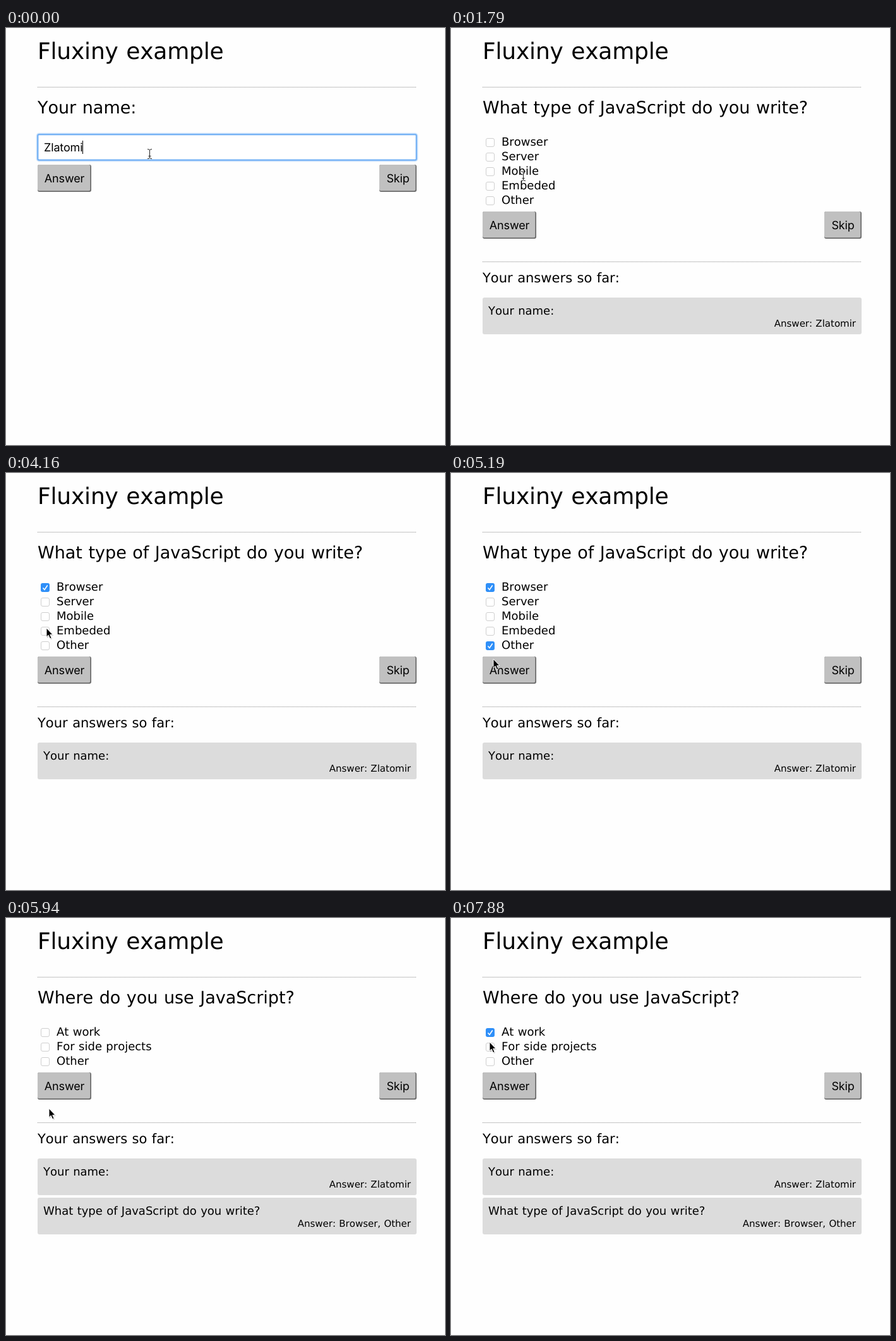
Write an HTML page that moves like this. It is 695 px wide and 659 px high and loops after 8 s.

```html
<!DOCTYPE html>
<html lang="en">
<head>
<meta charset="utf-8">
<title>Fluxiny example</title>
<style>
  html, body { margin: 0; width: 100%; height: 100%; overflow: hidden; background: #fefefe; }
  svg { display: block; width: 695px; height: 659px; }
  text {
    font-family: "DejaVu Sans", Verdana, sans-serif;
    font-size: 18px; word-spacing: .034em; font-kerning: none;
    text-rendering: geometricPrecision; white-space: pre;
  }
  .h1 { font-size: 36px; letter-spacing: -.005em; }
  .h2 { font-size: 27px; }
  .h3 { font-size: 21.06px; }
  .small { font-size: 15px; text-anchor: end; }
  .ui { font-family: Inter, Roboto, sans-serif; letter-spacing: -.008em; word-spacing: 0; font-kerning: normal; }
  .mid { text-anchor: middle; }
  .ring rect { fill: none; stroke: #4c9bf2; }
  .dots { stroke: #8c8c8c; stroke-dasharray: 1 1; }
</style>
</head>
<body>
<svg viewBox="0 0 695 659">
  <rect width="695" height="659" fill="#fefefe"/>
  <text class="h1" x="50" y="49">Fluxiny example</text>
  <path class="dots" d="M50 93.5H650"/>
  <g id="page"></g>
  <g id="arrow">
    <path d="M1 1.5V16l3.3-3 2.4 5.2 2.4-1L6.800 12H11.300Z" fill="#000" opacity=".18"/>
    <path d="M0 0V14.200l3.200-3 2.500 5.600 2.400-1-2.400-5.300H10Z" fill="#000" stroke="#fff" stroke-width="1"/>
  </g>
  <g id="beam" fill="none">
    <path d="M.5-7V7" stroke="#fff" stroke-width="3" opacity=".7"/>
    <path d="M-3-7.500Q.5-7.500 .5-5.500V5.500Q.5 7.500-3 7.500M4-7.500Q.5-7.500 .5-5.500M4 7.500Q.5 7.500 .5 5.500M-1.500 3.500H2.500" stroke="#222"/>
  </g>
</svg>
<script>
const LOOP = 8000;
const NAME = 'Zlatomir';
const $ = id => document.getElementById(id);
const page = $('page');

const languages = {
  title: 'What type of JavaScript do you write?',
  options: ['Browser', 'Server', 'Mobile', 'Embeded', 'Other']
};
const places = {
  title: 'Where do you use JavaScript?',
  options: ['At work', 'For side projects', 'Other']
};
const answers = [['Your name:', NAME], [languages.title, 'Browser, Other']];

// Pointer moves: start time, step length, step count, from, to, sideways bend
const moves = [
  [590, 150, 4, [227, 199], [114, 234], 0],
  [2390, 146.7, 6, [114, 234], [63, 184], 0],
  [3570, 147.1, 8, [63, 184], [65, 273], 0],
  [4898, 147.5, 3, [65, 273], [68, 301], 0],
  [6540, 148.6, 8, [68, 301], [61, 184], -8],
  [7880, 120, 1, [61, 184], [61, 196], 0]
];

const text = (cls, x, y, str) => `<text class="${cls}" x="${x}" y="${y}">${str}</text>`;
const rect = (x, y, w, h, r, attrs) =>
  `<rect x="${x}" y="${y}" width="${w}" height="${h}" rx="${r}" ${attrs}/>`;

function button(x, y, w, label) {
  return rect(x, y, w, 43, 3, 'fill="#6c6c6c"') +
    rect(x, y, w - 1.7, 41.3, 2.5, 'fill="#c0c0c0"') +
    text('ui mid', x + w / 2, y + 28, label);
}

const buttons = y => button(50, y, 85, 'Answer') + button(591, y, 59, 'Skip');

function checkbox(y, label, on) {
  const box = on
    ? rect(55, y, 14, 14, 3, 'fill="#2f8ff8"') +
      `<path d="M58.500 ${y + 7.5}l2.500 3 4.700-7" fill="none" stroke="#fff" stroke-width="1.6"/>`
    : rect(55.5, y + .5, 13, 13, 2.5, 'fill="#fff" stroke="#cfcfcf"');
  return box + text('', 80, y + 12, label);
}

function history(y, count, top, gap) {
  const items = answers.slice(0, count).map(([question, answer], i) => {
    const py = y + top + i * gap;
    return rect(50, py, 600, 58, 3, 'fill="#dcdcdc"') +
      text('', 59, py + 27, question) + text('small', 641, py + 46, 'Answer: ' + answer);
  });
  return `<path class="dots" d="M50 ${y + .5}H650"/>` +
    text('h3', 50, y + 33, 'Your answers so far:') + items.join('');
}

function nameForm(typed, caret) {
  const glow = [[6, .16], [4, .3], [2, .75]].map(([w, o]) =>
    rect(50.5, 168.5, 599, 40, 2, `stroke-width="${w}" opacity="${o}"`)).join('');
  const field = `<g class="ring">${glow}</g>` + rect(51.5, 169.5, 597, 38, 0, 'fill="#fff"');
  page.innerHTML = text('h2', 50, 135, 'Your name:') + field +
    text('ui typed', 60, 195, typed) + buttons(216);
  if (!caret) return;
  const x = Math.round(60 + page.querySelector('.typed').getComputedTextLength());
  page.insertAdjacentHTML('beforeend', rect(x, 178, 1, 21, 0, 'fill="#000"'));
}

function loading(count) {
  page.innerHTML = text('h2', 50, 135, 'Loading. Please wait.') + history(190, count, 58, 61);
}

function choices({ title, options }, checked, count) {
  const end = 175 + 23 * options.length;
  page.innerHTML = text('h2', 50, 135, title) +
    options.map((label, i) => checkbox(174 + 23 * i, label, checked.includes(i))).join('') +
    buttons(end) + history(end + 79, count, 57, 62);
}

const scenes = [
  [0, () => nameForm(NAME.slice(0, -1), true)],
  [140, () => nameForm(NAME, true)],
  [740, () => nameForm(NAME, false)],
  [1190, () => loading(1)],
  [1790, () => choices(languages, [], 1)],
  [3270, () => choices(languages, [0], 1)],
  [4750, () => choices(languages, [0, 4], 1)],
  [5340, () => loading(2)],
  [5940, () => choices(places, [], 2)],
  [7730, () => choices(places, [0], 2)]
];

function pointer(t) {
  let at = moves[0][3];
  for (const [start, step, count, from, to, bend] of moves) {
    if (t < start) break;
    const k = Math.min(count, Math.floor((t - start) / step) + 1) / count;
    const e = k * k * (3 - 2 * k);
    at = from.map((v, i) => v + (to[i] - v) * e);
    at[0] += bend * Math.sin(Math.PI * e);
  }
  return at;
}

function overText(t, [x, y]) {
  if (t < 1190) return y > 168 && y < 209;
  return t >= 1790 && t < 5340 && x > 78 && x < 163 && y > 172 && y < 284;
}

let shown = -1;
function draw(t) {
  const index = scenes.filter(([start]) => start <= t).length - 1;
  if (index !== shown) scenes[shown = index][1]();
  const [x, y] = pointer(t);
  const isText = overText(t, [x, y]);
  for (const [id, on] of [['arrow', !isText], ['beam', isText]]) {
    $(id).setAttribute('transform', `translate(${Math.round(x)} ${Math.round(y)})`);
    $(id).setAttribute('visibility', on ? 'visible' : 'hidden');
  }
}

const begin = performance.now();
function tick() {
  draw((performance.now() - begin) % LOOP);
  requestAnimationFrame(tick);
}
tick();
</script>
</body>
</html>
```
